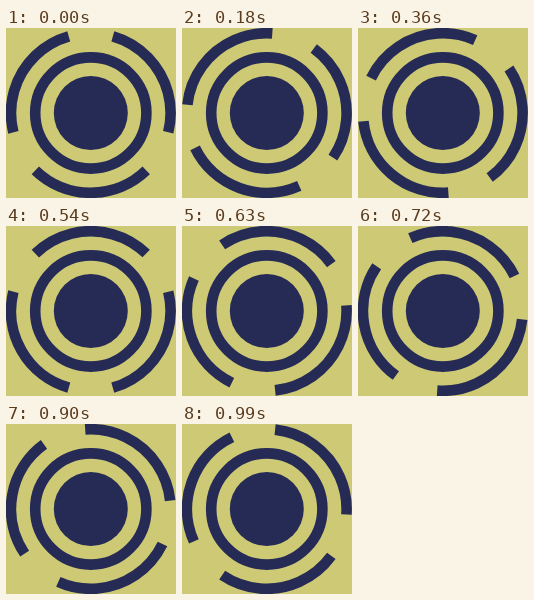
Animation of 170x170 px, one loop 1080 ms. Source, as an HTML page:

```html
<!DOCTYPE html>
<html lang="en">
<head>
<meta charset="utf-8">
<style>
  html, body { margin: 0; height: 100%; overflow: hidden; background: #cdc975; }
  svg { display: block; width: 100vw; height: 100vh; }
</style>
</head>
<body>
<svg viewBox="0 0 170 170">
  <g transform="translate(84.8 85)" fill="none" stroke="#262b56" stroke-width="10.6">
    <circle r="37" fill="#262b56" stroke="none"/>
    <circle r="55.6"/>
    <circle id="arcs" r="79.8" pathLength="360" stroke-dasharray="88 32"/>
  </g>
</svg>
<script>
  const LOOP = 1080, STEP = 90, TURN = 10, START = 46;
  const arcs = document.getElementById('arcs');

  function draw(now) {
    const step = Math.floor((now % LOOP) / STEP);
    arcs.setAttribute('transform', `rotate(${START + step * TURN})`);
  }

  const t0 = performance.now();
  function tick() {
    draw(performance.now() - t0);
    requestAnimationFrame(tick);
  }
  tick();
</script>
</body>
</html>
```
